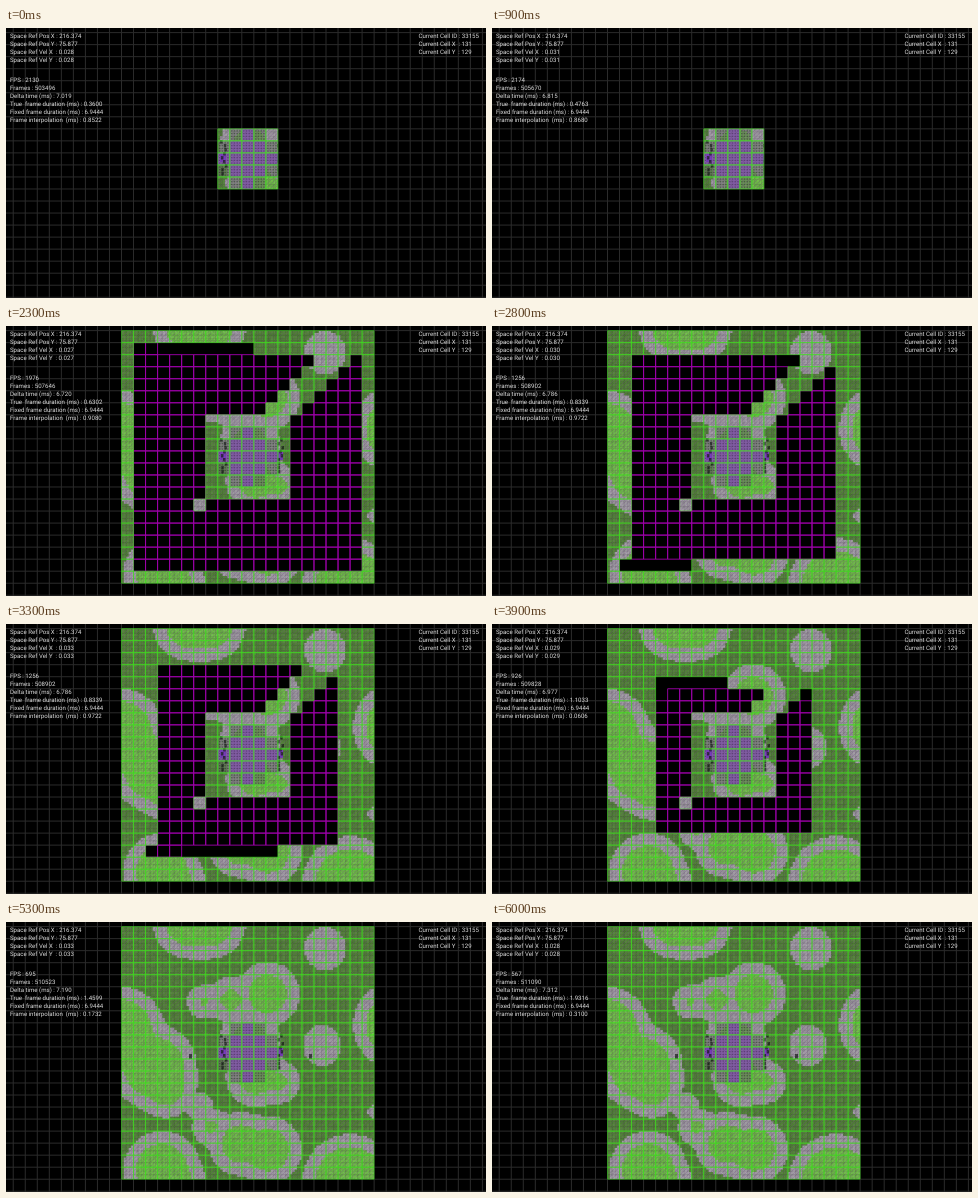
An HTML page with a canvas that plays this animation: 480x270 px, repeating every 6050 ms.

```html
<!DOCTYPE html>
<html lang="en">
<head>
<meta charset="utf-8">
<title>Cell streaming</title>
<style>
  html, body { margin: 0; width: 100%; height: 100%; overflow: hidden; background: #000; }
  canvas, svg { position: absolute; left: 0; top: 0; width: 480px; height: 270px; }
  text {
    font: 6.1px Roboto, "Liberation Sans", sans-serif; fill: #dcdcdc;
    white-space: pre; text-rendering: geometricPrecision;
  }
</style>
</head>
<body>
<canvas id="map" width="480" height="270"></canvas>
<svg id="hud" viewBox="0 0 480 270"></svg>
<script>
const LOOP = 6050, STEP = 50;
const CELL = 12.03, LEFT = 115.5, TOP = 4.6, COUNT = 21, MID = 10, TILES = 5;
const SIZE = CELL * COUNT;
const ctx = document.getElementById('map').getContext('2d');
const px = col => LEFT + col * CELL;
const py = row => TOP + row * CELL;

function makeCanvas(width, height) {
  const canvas = document.createElement('canvas');
  canvas.width = width;
  canvas.height = height;
  return canvas;
}

function makeRandom(seed) {
  return () => (seed = (seed * 16807) % 2147483647) / 2147483647;
}

// ---------- terrain: smoothly joined circles [x, y, radius] ----------
const SHORE = 13;
const HILLS = [
  [[183, 1, 36], [204, 1, 36]],
  [[391, 103, 44]],
  [[344, 260, 48]],
  [[156, 248, 39], [164, 268, 38]],
  [[112, 112, 48], [148, 145, 43], [160, 165, 31]],
  [[205, 205, 19], [235, 222, 32], [262, 228, 34]],
  [[262, 72, 32], [225, 78, 23], [198, 80, 17], [244, 118, 30], [250, 155, 30], [272, 160, 22]]
];
const ROCKS = [
  [[319, 24, 19], [319, 29, 19]],
  [[316, 120, 17], [316, 127, 17]],
  [[193, 184, 14]],
  [[370, 190, 8]]
];

function smoothMin(a, b, blend = 8) {
  const h = Math.max(0, blend - Math.abs(a - b)) / blend;
  return Math.min(a, b) - h * h * blend / 4;
}

const circleDistance = (x, y) => ([cx, cy, r]) => Math.hypot(x - cx, y - cy) - r;
const shapeDistance = (shape, x, y) => shape.map(circleDistance(x, y)).reduce((a, b) => smoothMin(a, b));
const nearest = (shapes, x, y) => Math.min(...shapes.map(shape => shapeDistance(shape, x, y)));

function tileColor(x, y) {
  const hill = nearest(HILLS, x, y);
  if (hill < -SHORE) return '#76c44e';
  return hill < 0 || nearest(ROCKS, x, y) < 0 ? '#a8a3ab' : '#588a3c';
}

function paintTiles(g) {
  const tile = CELL / TILES, random = makeRandom(7);
  for (let row = 0; row < COUNT * TILES; row++) for (let col = 0; col < COUNT * TILES; col++) {
    const x = LEFT + col * tile, y = TOP + row * tile;
    g.fillStyle = tileColor(x + tile / 2, y + tile / 2);
    g.fillRect(x, y, tile + .3, tile + .3);
    g.fillStyle = `rgba(0,0,0,${random() * .1})`;
    g.fillRect(x, y, tile, tile);
  }
}

function paintCentre(g) {
  for (let row = 8; row <= 12; row++) for (let col = 8; col <= 12; col++) {
    const distance = Math.abs(col - MID) + Math.abs(row - MID);
    if (distance > 3) continue;
    g.fillStyle = distance < 3 ? '#8560a8' : 'rgba(110,120,105,.55)';
    g.fillRect(px(col), py(row), CELL, CELL);
    g.fillStyle = distance < 3 ? 'rgba(45,25,65,.45)' : 'rgba(25,50,20,.5)';
    for (let i = 0; i < 16; i++) {
      g.fillRect(px(col) + 1.3 + (i % 4) * 2.7, py(row) + 1.5 + (i >> 2) * 2.7, 1.4, 1.2);
    }
  }
  // bright gates with dark scrub on both sides
  const random = makeRandom(21);
  for (const side of [214, 271]) {
    g.fillStyle = '#7a3cc0';
    g.fillRect(side, 126, 6, 8);
    g.fillStyle = 'rgba(15,25,15,.7)';
    for (let y = 112; y < 148; y += 4) g.fillRect(side + random() * 5, y, 2.5, 3.5);
  }
  for (const x of [183, 303]) g.fillRect(x, 132, 3, 5);
}

function strokeLines(g, color, spacing, lineAt) {
  g.strokeStyle = color;
  g.beginPath();
  for (let d = 0; d < 2 * SIZE; d += spacing) lineAt(d);
  g.stroke();
}

function paintTerrain() {
  const canvas = makeCanvas(480, 270), g = canvas.getContext('2d');
  g.beginPath();
  g.rect(LEFT, TOP, SIZE, SIZE);
  g.clip();
  paintTiles(g);
  paintCentre(g);
  g.lineWidth = .7;
  strokeLines(g, 'rgba(115,65,140,.42)', CELL / 3, d => {
    g.moveTo(LEFT + d, TOP);
    g.lineTo(LEFT + d - SIZE, TOP + SIZE);
  });
  strokeLines(g, 'rgba(60,60,60,.15)', CELL / 3, d => {
    g.moveTo(LEFT + d, TOP); g.lineTo(LEFT + d, TOP + SIZE);
    g.moveTo(LEFT, TOP + d); g.lineTo(LEFT + SIZE, TOP + d);
  });
  return canvas;
}

// ---------- load order ----------
// Rings are requested bottom-left to top-right; the newest request loads first.
const LOAD_START = 1150, LOAD_RATE = .113, EXPAND_START = 1350, EXPAND_STEP = 36;
const LOADS_PER_RING = 3, QUEUED = 8;

const ringOf = ([col, row]) => Math.max(Math.abs(col - MID), Math.abs(row - MID));

function ringCells(radius) {
  const cells = [];
  for (let y = radius; y >= -radius; y--) for (let x = -radius; x <= radius; x++) {
    if (Math.max(Math.abs(x), Math.abs(y)) === radius) cells.push([MID + x, MID + y]);
  }
  return cells;
}

function loadOrder() {
  const order = ringCells(3), waiting = [];
  for (let radius = 4; radius <= MID; radius++) {
    const ring = ringCells(radius);
    if (radius === 4) order.push(ring.shift());
    waiting.push(...ring);
    for (let i = 0; i < LOADS_PER_RING; i++) order.push(waiting.pop());
  }
  return order.concat(waiting.reverse());
}

function requestedRadius(t) {
  if (t < LOAD_START) return 2;
  if (t < EXPAND_START) return 3;
  return Math.min(MID, 4 + Math.floor((t - EXPAND_START) / EXPAND_STEP));
}

// ---------- drawing ----------
const ORDER = loadOrder();
const CORE = [0, 1, 2].flatMap(ringCells);
const terrain = paintTerrain();

function cellPath(cells) {
  const path = new Path2D();
  cells.forEach(([col, row]) => path.rect(px(col), py(row), CELL, CELL));
  return path;
}

function drawBackdrop() {
  ctx.fillStyle = '#000';
  ctx.fillRect(0, 0, 480, 270);
  ctx.strokeStyle = '#2b2b2b';
  ctx.lineWidth = 1;
  ctx.beginPath();
  for (let i = -10; i < 31; i++) {
    ctx.moveTo(px(i), 0); ctx.lineTo(px(i), 270);
    ctx.moveTo(0, py(i)); ctx.lineTo(480, py(i));
  }
  ctx.stroke();
}

function drawMap(t) {
  drawBackdrop();
  const count = Math.min(ORDER.length, Math.max(0, Math.floor((t - LOAD_START) * LOAD_RATE)));
  const radius = requestedRadius(t);
  const inRange = cell => ringOf(cell) <= radius;

  ctx.fillStyle = '#000';
  ctx.fill(cellPath(ORDER.slice(count).filter(inRange)));
  ctx.strokeStyle = '#a000ac';
  ctx.lineWidth = .9;
  ctx.stroke(cellPath(ORDER.slice(count + QUEUED).filter(inRange)));

  const loaded = cellPath([...CORE, ...ORDER.slice(0, count)]);
  ctx.save();
  ctx.clip(loaded);
  ctx.drawImage(terrain, 0, 0);
  ctx.restore();
  ctx.strokeStyle = 'rgba(64,226,32,.62)';
  ctx.stroke(loaded);
}

// ---------- readouts ----------
const hud = document.getElementById('hud');
const LINE = 7.9;

function addText(x, y, content = '') {
  const node = document.createElementNS('http://www.w3.org/2000/svg', 'text');
  node.setAttribute('x', x);
  node.setAttribute('y', y);
  node.textContent = content;
  hud.append(node);
  return node;
}

const addColumn = (x, y, labels) => labels.map((label, i) => addText(x, y + i * LINE, label));

addColumn(4, 10.4, ['Space Ref Pos X : 216.374', 'Space Ref Pos Y : 75.877']);
addColumn(412.5, 10.4, ['Current Cell ID : 33155', 'Current Cell X  : 131', 'Current Cell Y  : 129']);
const velocityNodes = addColumn(4, 10.4 + 2 * LINE, ['', '']);
const STAT_LABELS = ['FPS', 'Frames', 'Delta time (ms)', 'True  frame duration (ms)',
  'Fixed frame duration (ms)', 'Frame interpolation  (ms)'];
const statNodes = addColumn(4, 54.2, STAT_LABELS);

const FPS = [2130, 2174, 1976, 1256, 926, 695, 567];
const FIRST_FRAME = 503496;

function drawReadouts(t) {
  const speed = (.03 + .003 * Math.sin(Math.PI * (t - 2800) / 1000)).toFixed(3);
  velocityNodes.forEach((node, i) => {
    node.textContent = `Space Ref Vel ${'XY'[i]}  : ${speed}`;
  });
  // counters refresh once a second
  const n = Math.floor((t + 200) / 1000);
  const values = [
    FPS[n],
    FPS.slice(1, n + 1).reduce((sum, fps) => sum + fps, FIRST_FRAME),
    (7.019 - .3 * Math.sin(.75 * n)).toFixed(3),
    (.36 * Math.exp(.28 * n)).toFixed(4),
    '6.9444',
    ((.8522 + .0037 * n + .0121 * n * n) % 1).toFixed(4)
  ];
  values.forEach((value, i) => { statNodes[i].textContent = `${STAT_LABELS[i]} : ${value}`; });
}

const start = performance.now();
function tick() {
  const t = Math.floor(((performance.now() - start) % LOOP) / STEP) * STEP;
  drawMap(t);
  drawReadouts(t);
  requestAnimationFrame(tick);
}
tick();
</script>
</body>
</html>
```
